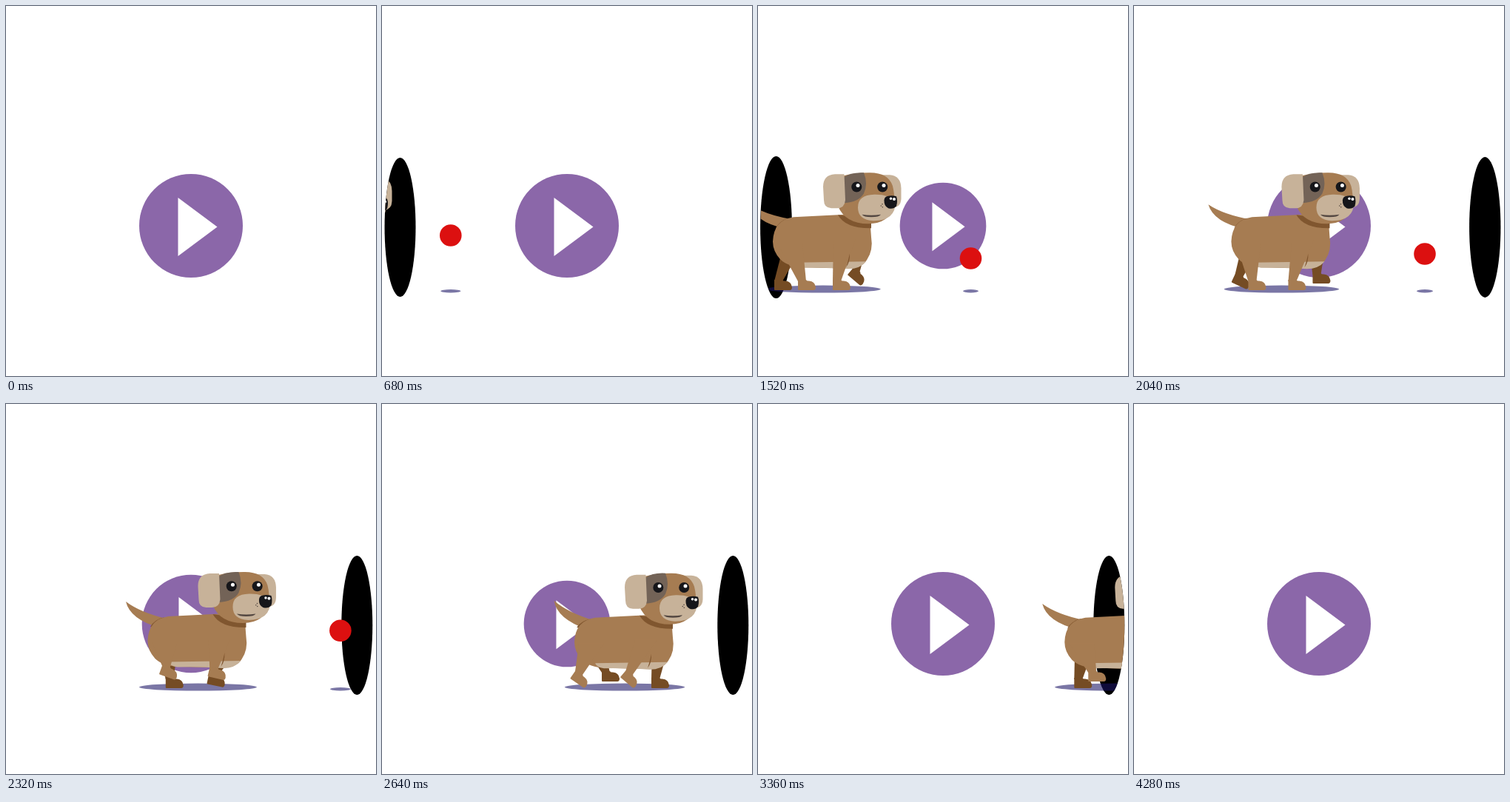
An HTML page for the animation above (4.44 s loop, 500 by 500 pixels).

```html
<!DOCTYPE html>
<html lang="en">
<head>
<meta charset="utf-8">
<title>Dog chasing a ball</title>
<style>
  html, body { margin: 0; width: 100%; height: 100%; overflow: hidden; background: #fff; }
  svg { display: block; width: 100vw; height: 100vh; }
  .coat { fill: #a67c52; }
  .far { fill: #754c24; }
  .pale { fill: #c7b299; }
  .crease { fill: #80562f; }
  .shade { fill: #1b1464; fill-opacity: .58; }
  .ink { fill: #16161a; }
  .glint { fill: #fff; }
</style>
</head>
<body>
<svg viewBox="0 0 500 500">
  <defs>
    <clipPath id="between">
      <ellipse cx="24.5" cy="299" rx="21" ry="94"/>
      <rect x="24.5" y="0" width="449.8" height="500"/>
      <ellipse cx="474.3" cy="299" rx="21" ry="94"/>
    </clipPath>
    <path id="foot" d="M-12 -1 V-14 H-1 Q0 -12 3 -12.5 Q11 -12 12 -4 Q12 0 9 0 H-11 Q-12 0 -12 -1Z"/>
  </defs>

  <ellipse id="entry" rx="21" ry="94"/>
  <ellipse id="exit" rx="21" ry="94"/>

  <g id="button">
    <circle r="70" fill="#8b67a9"/>
    <path d="M-17.5 -38 L35.5 1.5 L-17.5 41Z" fill="#fff"/>
  </g>

  <g clip-path="url(#between)">
    <ellipse id="ballShade" class="shade" cy="385.2" ry="2.2"/>
    <circle id="ball" r="14.8" fill="#dc1010"/>

    <g id="dog">
      <ellipse id="dogShade" class="shade" cx="88" cy="382.6" ry="5"/>
      <g id="farLegs" class="far"></g>
      <g class="bob">
        <g id="tail">
          <path class="coat" d="M-11 268 Q10 282 46 288 L38 301 Q-4 292 -11 268Z"/>
          <path class="crease" d="M24 300 Q29 290 41 286.500 L46 288 L34 303Z"/>
        </g>
        <path class="coat" d="M48 285 L128 281 L152 292 Q152 302 153 312 Q156 330 147 343 Q140 354 122 354.500 L62 353 Q40 352 30 342 Q20 331 20 318 Q21 289 48 285Z"/>
        <path class="pale" d="M48 346.500 L146 345 Q138 355 122 355 Q90 352.500 60 353.500 Q50 352 48 346.500Z"/>
      </g>
      <g id="nearLegs" class="coat"></g>
      <g class="bob">
        <path class="crease" d="M124 334 Q124.500 346 119 353 Q122 344 124 334Z"/>
        <path class="crease" d="M108 282 Q118 300.500 153 300 V291 L150 288Z"/>
        <path class="pale" d="M165 228 H178 Q193 229 193.500 246 V260 Q193 272 182 272 H170Z"/>
        <path class="coat" d="M108 270 L116 229 Q130 225 150 225 Q176 224.500 182 243 Q185 255 184 268 Q178 294 149 294 Q118 294 108 270Z"/>
        <path fill="#736357" d="M116 231 Q126 224 143 225 Q149 240 143 253 Q136 265 116 266Z"/>
        <path class="pale" d="M104 227 H116.500 L118 262 Q117 273 107 273 H99 Q89 272.500 89 262 L88 244 Q88 228 104 227Z"/>
        <path class="pale" d="M135 272 Q135 255 157 254.500 Q177 254 186 264 Q186 290 156 290 Q135 289 135 272Z"/>
        <path fill="#534741" d="M140.500 281.500 Q153 283.500 166 281.500 Q164 285 153 285 Q143 285 140.500 281.500Z"/>
        <circle class="ink" cx="133.300" cy="244.200" r="7"/>
        <circle class="ink" cx="168.200" cy="244.200" r="7"/>
        <circle class="glint" cx="135" cy="242.300" r="2.500"/>
        <circle class="glint" cx="170" cy="242.300" r="2.500"/>
        <path class="ink" d="M174 257 Q181 255 187 257 Q189 263 187 270 Q183 275 176 273 Q170 270 170.500 262 Q171 258 174 257Z"/>
        <circle class="glint" cx="179.500" cy="260" r="1.700"/>
        <circle class="glint" cx="184" cy="260.800" r="2"/>
        <g fill="#534741">
          <circle cx="168" cy="267.500" r=".8"/>
          <circle cx="166.300" cy="269.800" r=".8"/>
          <circle cx="168.300" cy="271.500" r=".8"/>
        </g>
      </g>
    </g>
  </g>
</svg>
<script>
const LOOP = 4440, STEP = 40, STRIDE = 480, GROUND = 384;
const $ = id => document.getElementById(id);
const clamp = v => Math.min(1, Math.max(0, v));
const set = (el, attrs) => { for (const k in attrs) el.setAttribute(k, attrs[k]); };
const move = (el, x, y, more = '') => el.setAttribute('transform', `translate(${x} ${y}) ${more}`);

const backIn = p => p * p * (2.58 * p - 1.58);
const backOut = p => 1 - backIn(1 - p);
const easeInOut = p => p < .5 ? 4 * p ** 3 : 1 - 4 * (1 - p) ** 3;

// Linear interpolation through key positions, held at both ends
function track(at, values, t) {
  let i = 1;
  while (i < at.length - 1 && t > at[i]) i++;
  const p = clamp((t - at[i - 1]) / (at[i] - at[i - 1]));
  return values[i - 1] + (values[i] - values[i - 1]) * p;
}
const BEATS = [0, 40, 160, 280, 400, STRIDE];
const cycle = (values, phase) => track(BEATS, [...values, values[0]], phase);

// Foot position, height above ground and tilt through one stride
const legs = [
  { group: 'farLegs', hip: [47, 325], half: 13, x: [34, 31, 69, 62, 45], lift: [0, 1, 9, 0, 0], tilt: [0, 25, 0, 0, 0] },
  { group: 'farLegs', hip: [136, 325], half: 11, x: [130, 142, 136, 115, 105], lift: [6, 9, 0, 0, 3], tilt: [40, 0, 0, 0, 35] },
  { group: 'nearLegs', hip: [43, 320], half: 17, x: [66, 55, 24, 38, 64], lift: [0, 0, 0, 12, 9], tilt: [0, 0, 35, 30, 0] },
  { group: 'nearLegs', hip: [117, 315], half: 15, x: [113, 109, 91, 110, 118], lift: [0, 0, 0, 12, 8], tilt: [0, 0, 40, 20, 0] }
];
const make = (name, parent) =>
  parent.appendChild(document.createElementNS('http://www.w3.org/2000/svg', name));
for (const leg of legs) {
  leg.shin = make('path', $(leg.group));
  leg.foot = make('use', $(leg.group));
  leg.foot.setAttribute('href', '#foot');
}
const bobbing = document.querySelectorAll('.bob');

function drawLeg(leg, phase, bob) {
  const tilt = cycle(leg.tilt, phase), a = tilt * Math.PI / 180;
  const c = Math.cos(a), s = Math.sin(a);
  const x = cycle(leg.x, phase);
  const y = GROUND - cycle(leg.lift, phase) - 11 * s;
  const ax = x - 6.5 * c + 12 * s, ay = y - 6.5 * s - 12 * c;
  const [hx, hy] = [leg.hip[0], leg.hip[1] + bob];
  leg.shin.setAttribute('d', `M${hx - leg.half} ${hy} L${ax - 5.5 * c} ${ay - 5.5 * s}
    L${ax + 5.5 * c} ${ay + 5.5 * s} L${hx + leg.half} ${hy}Z`);
  move(leg.foot, x, y, `rotate(${tilt})`);
}

function drawDog(t) {
  const phase = (t - 1520 + 4 * STRIDE) % STRIDE;
  const bob = 2 - 2 * Math.cos(4 * Math.PI * (phase - 20) / STRIDE);
  move($('dog'), (t - 1520) * .2143, 0);
  bobbing.forEach(el => move(el, 0, bob));
  $('tail').setAttribute('transform', `rotate(${cycle([0, 0, 7, 4, 2], phase)} 40 293)`);
  $('dogShade').setAttribute('rx', 77.5 + bob);
  legs.forEach(leg => drawLeg(leg, phase, bob));
}

function drawBall(t) {
  const x = track([240, 560, 680, 1520, 2040, 2620], [-16, 63, 92.8, 287.5, 393, 515], t);
  const y = 315 + 26.5 * Math.cos(2 * Math.PI * (t - 1520) / STRIDE + .19);
  set($('ball'), { cx: x, cy: y });
  set($('ballShade'), { cx: x, rx: 13.5 - (y - 310) * .097 });
}

function drawPortal(el, x, t, open, close) {
  const size = backOut(clamp((t - open) / 414)) - backIn(clamp((t - close) / 500));
  move(el, x, 299, `scale(${Math.max(0, size)})`);
}

function drawButton(t) {
  const beat = clamp((t - 960) / 2240) * 2 % 1;
  const press = easeInOut(1 - Math.abs(2 * beat - 1));
  move($('button'), 250, 297, `scale(${1 - press / 6})`);
}

function draw(now) {
  const t = Math.floor(now % LOOP / STEP) * STEP;
  drawPortal($('entry'), 24.5, t, 21, 1455);
  drawPortal($('exit'), 474.3, t, 1661, 3760);
  drawButton(t);
  drawBall(t);
  drawDog(t);
}

const start = performance.now();
function tick() {
  draw(performance.now() - start);
  requestAnimationFrame(tick);
}
tick();
</script>
</body>
</html>
```
